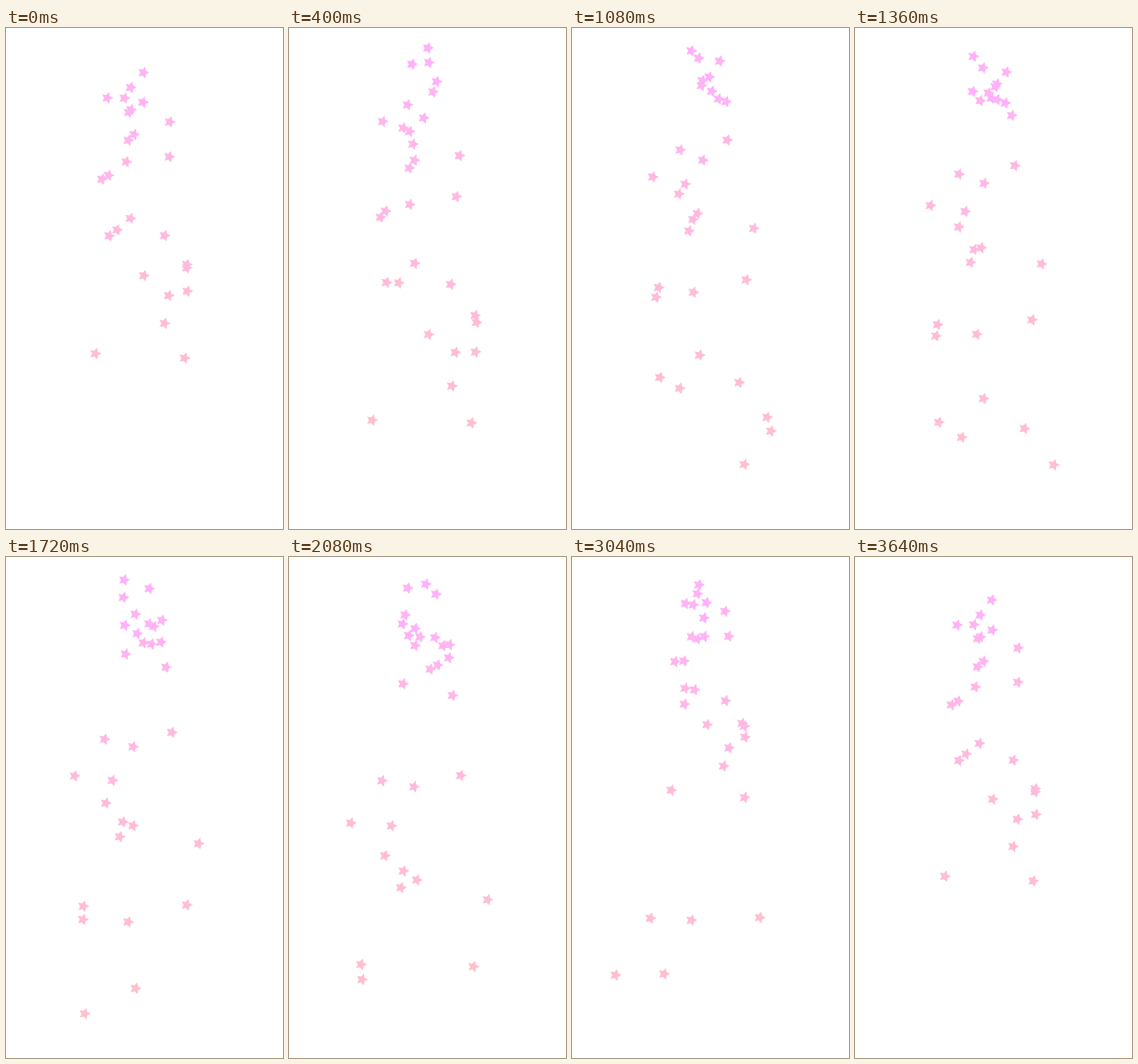
Write an HTML page with a canvas that moves like this. It is 332 by 600 pixels and loops after 3680 ms.

```html
<!DOCTYPE html>
<html lang="en">
<head>
<meta charset="utf-8">
<title>Falling stars</title>
<style>
  html, body { margin: 0; width: 100%; height: 100%; overflow: hidden; background: #fff; }
  canvas { display: block; }
</style>
</head>
<body>
<canvas id="stage" width="332" height="600"></canvas>
<script>
const ctx = document.getElementById('stage').getContext('2d');
const LOOP = 3680, STEP = 40;
const GRAVITY = 50.6;            // px/s²
const BORN = 100, DEAD = 4320;   // visible span of a fall, ms
const RADIUS = 7.4, INNER = 0.5, TILT = 17 * Math.PI / 180;
const FROM = [255, 176, 255], TO = [255, 192, 203];

// start of fall (ms), x, y, sideways speed (px/s)
const stars = [
  [-60, 176.2, 36, -18.5], [45, 172.9, 61, 11.3], [170, 144.3, 42, 13],
  [285, 164.6, 23.6, 15.5], [400, 148.1, 24.4, 5.2], [520, 161.5, 67.8, 10.6],
  [643, 155.6, 53.9, 20.1], [750, 144.2, 24.6, -3.8], [872, 172.3, 83.8, 15.8],
  [1000, 164.6, 66.9, 9.5], [1115, 167.5, 82.4, -17.1], [1225, 140.5, 75.6, 3.5],
  [1360, 141.1, 24.1, 1.3], [1525, 169.3, 36.8, 12.2], [1633, 141.9, 75.1, -13.2],
  [1760, 156.6, 83.1, -17.6], [1890, 160.2, 31.5, 20.1], [2005, 142.3, 30.1, 2.9],
  [2120, 162.2, 22.5, -13], [2235, 155.2, 81.6, -6], [2360, 163.9, 83.5, -7.9],
  [2490, 148.5, 48, -22.8], [2590, 163.9, 67.8, -13], [2740, 146, 31, 19.8],
  [2850, 164.4, 53.7, -18.2], [2950, 169.1, 75.4, -6.9]
];

const shape = new Path2D();
for (let i = 0; i < 10; i++) {
  const r = i % 2 ? RADIUS * INNER : RADIUS;
  const a = TILT + i * Math.PI / 5;
  shape.lineTo(r * Math.sin(a), -r * Math.cos(a));
}
shape.closePath();

function drawStar([, x, y, speed], age) {
  if (age < BORN || age >= DEAD) return;
  const s = age / 1000, k = (age - BORN) / (DEAD - BORN);
  const rgb = FROM.map((c, i) => Math.round(c + (TO[i] - c) * k));
  ctx.setTransform(1, 0, 0, 1, x + speed * s, y + GRAVITY * s * s / 2);
  ctx.fillStyle = `rgb(${rgb})`;
  ctx.fill(shape);
}

function draw(now) {
  const t = Math.floor(now / STEP) * STEP % LOOP;
  ctx.setTransform(1, 0, 0, 1, 0, 0);
  ctx.clearRect(0, 0, 332, 600);
  for (const star of stars) {
    const age = (t - star[0] + LOOP) % LOOP;
    drawStar(star, age + LOOP);
    drawStar(star, age);
  }
}

const start = performance.now();
function tick() {
  draw(performance.now() - start);
  requestAnimationFrame(tick);
}
tick();
</script>
</body>
</html>
```
